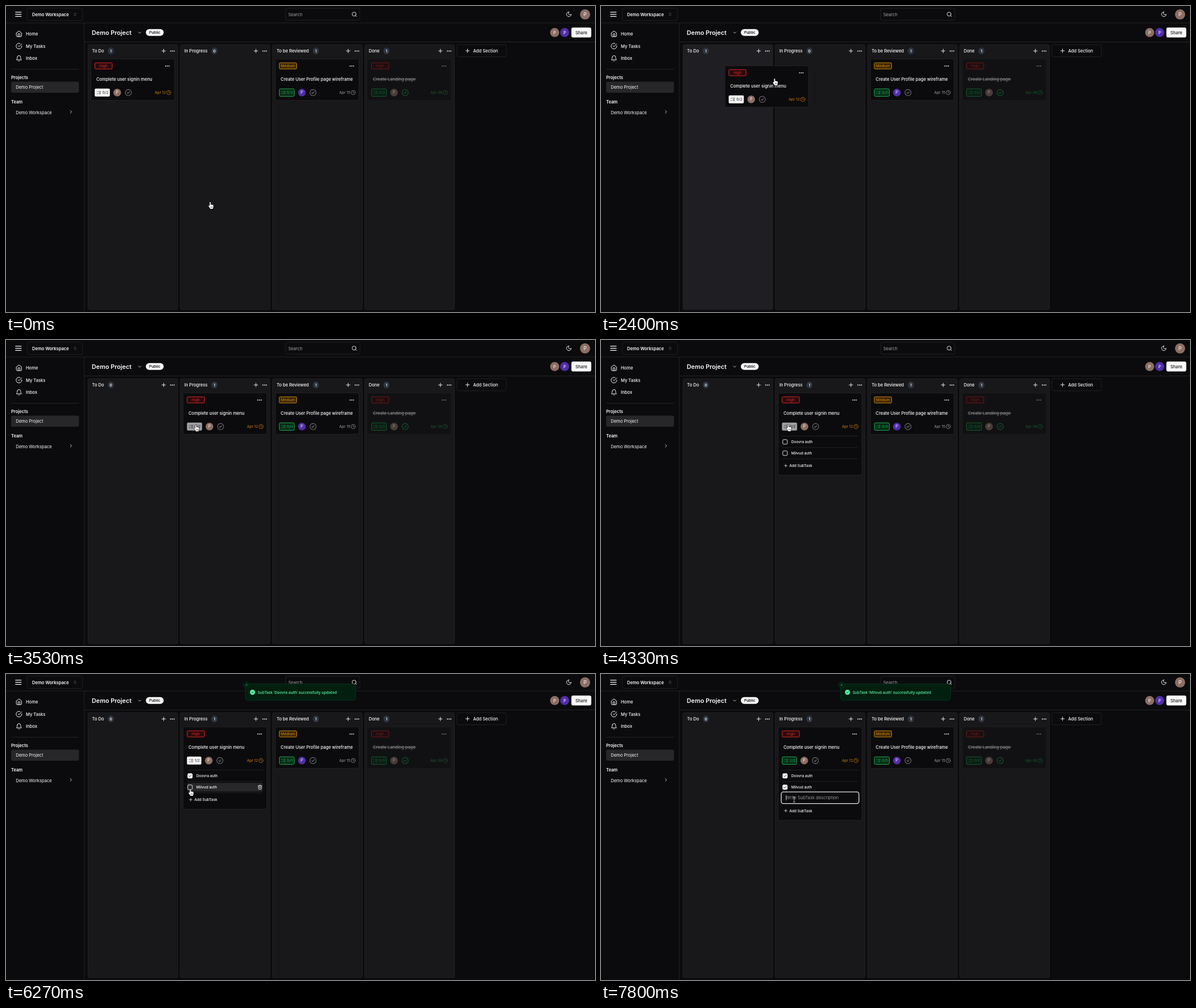
Animation, 1037 px wide and 540 px high, one loop 8 s. Source, as an HTML page with a canvas:

```html
<!DOCTYPE html>
<html lang="en">
<head>
<meta charset="utf-8">
<title>Task board</title>
<style>
html, body { margin: 0; width: 100%; height: 100%; overflow: hidden; background: #0b0b0d; }
canvas { display: block; width: 1037px; height: 540px; }
</style>
</head>
<body>
<canvas id="stage"></canvas>
<script>
const W = 1037, H = 540, LOOP = 8000, STEP = 200 / 3;
const canvas = document.getElementById('stage');
const ctx = canvas.getContext('2d');
const dpr = window.devicePixelRatio || 1;
canvas.width = Math.round(W * dpr);
canvas.height = Math.round(H * dpr);

const BG = '#0b0b0d', COLUMN = '#18181a', ACTIVE = '#1f1f23', LINE = '#27272a';
const WHITE = '#fafafa', GREY = '#a1a1aa', RED = '#dc2626', AMBER = '#d98a0b', GREEN = '#1fae55';
const BROWN = '#8d6e63', PURPLE = '#512da8';
const INTER = 'Inter, sans-serif', SYSTEM = '"Open Sans", sans-serif';
const SM = 7.56, XS = 6.48;

const RING = 'M22 12a10 10 0 1 1-20 0a10 10 0 0 1 20 0';
const ICONS = {
  menu: 'M4 6h16M4 12h16M4 18h16',
  home: 'M3 9l9-7 9 7v11a2 2 0 0 1-2 2H5a2 2 0 0 1-2-2zM9 22V12h6v10',
  tasks: 'M22 11.08V12a10 10 0 1 1-5.93-9.14M22 4 12 14.01l-3-3',
  bell: 'M6 8a6 6 0 0 1 12 0c0 7 3 9 3 9H3s3-2 3-9M10.3 21a1.94 1.94 0 0 0 3.4 0',
  search: 'M19 11a8 8 0 1 1-16 0a8 8 0 0 1 16 0M21 21l-4.3-4.3',
  moon: 'M12 3a6 6 0 0 0 9 9 9 9 0 1 1-9-9Z',
  down: 'M6 9l6 6 6-6',
  right: 'M9 18l6-6-6-6',
  sort: 'M7 15l5 5 5-5M7 9l5-5 5 5',
  plus: 'M5 12h14M12 5v14',
  list: 'M3 17l2 2 4-4M3 7l2 2 4-4M13 6h8M13 12h8M13 18h8',
  done: RING + 'M8 12l3 3 5-6',
  clock: RING + 'M12 6v6l4 2',
  check: 'M20 6 9 17l-5-5',
  trash: 'M3 6h18M19 6v14c0 1-1 2-2 2H7c-1 0-2-1-2-2V6M8 6V4c0-1 1-2 2-2h4c1 0 2 1 2 2v2M10 11v6M14 11v6',
  close: 'M18 6 6 18M6 6l12 12'
};
for (const name in ICONS) ICONS[name] = new Path2D(ICONS[name]);

const HAND = new Path2D('M-2.4 1.6V-5a.9.9 0 0 1 1.8 0V-1.4a.9.9 0 0 1 1.6.2a.9.9 0 0 1 1.6.3a.9.9 0 0 1 1.5.6V2.5q0 1.6-1 3V6H-1.6V5.2L-4.3 1.4a.9.9 0 0 1 1.4-1.1Z');

// time, x, y, smooth
const CURSOR = [
  [0, 361, 352], [533, 184, 166, 1], [600, 184, 166], [867, 175, 161], [1667, 175, 161],
  [1733, 176, 157], [1933, 254, 121], [2067, 254, 121], [2400, 307, 134], [2600, 365, 118],
  [2800, 393, 103], [2933, 396, 102], [3000, 390, 110], [3067, 372, 135], [3333, 340, 157],
  [3800, 330, 153], [3867, 331, 154], [4267, 331, 154], [4333, 331, 155], [4667, 326, 186, 1],
  [5400, 326, 186], [6000, 326, 207, 1], [6200, 326, 207], [6267, 326, 209], [7333, 326, 209],
  [7600, 340, 222, 1]
];
const DRAG = [
  [2067, 0, 0], [2400, 68.6, 12], [2600, 116, 2], [2800, 150, -18],
  [2933, 156, -20.5], [3067, 160, -20.5], [3467, 162.4, 0, 1]
];
const COLUMNS = [
  { x: 144, name: 'To Do', badge: 184.6 },
  { x: 306.4, name: 'In Progress', badge: 367 },
  { x: 468.8, name: 'To be Reviewed', badge: 545.6 },
  { x: 631.2, name: 'Done', badge: 669.8 }
];
const COUNT_WIDTH = { '0/2': 26.6, '1/2': 25.4, '2/2': 26.2, '0/0': 27 };
const SUBTASKS = ['Doovra auth', 'Milvud auth'];

const clamp = v => Math.max(0, Math.min(1, v));
const easeOut = p => 1 - Math.pow(1 - clamp(p), 3);

function along(keys, t) {
  let i = 1;
  while (i < keys.length - 1 && keys[i][0] < t) i++;
  const a = keys[i - 1], b = keys[i];
  let p = clamp((t - a[0]) / (b[0] - a[0]));
  if (b[3]) p = p * p * (3 - 2 * p);
  return { x: a[1] + (b[1] - a[1]) * p, y: a[2] + (b[2] - a[2]) * p };
}

function text(str, x, y, size, color, weight = 400, align = 'left', family = INTER) {
  ctx.font = `${weight} ${size}px ${family}`;
  ctx.textAlign = align;
  ctx.fillStyle = color;
  ctx.fillText(str, x, y + size * 0.36);
}

function box(x, y, w, h, r, fill, stroke, lw = 0.8) {
  ctx.beginPath();
  ctx.roundRect(x, y, w, h, r);
  if (fill) { ctx.fillStyle = fill; ctx.fill(); }
  if (stroke) { ctx.strokeStyle = stroke; ctx.lineWidth = lw; ctx.stroke(); }
}

function disc(x, y, r, fill, stroke) {
  box(x - r, y - r, 2 * r, 2 * r, r, fill, stroke);
}

function rule(x, y, w, h) {
  ctx.fillStyle = LINE;
  ctx.fillRect(x, y, w, h);
}

function icon(name, x, y, size, color, lw = 2) {
  ctx.save();
  ctx.translate(x - size / 2, y - size / 2);
  ctx.scale(size / 24, size / 24);
  ctx.strokeStyle = color;
  ctx.lineWidth = lw;
  ctx.lineCap = ctx.lineJoin = 'round';
  ctx.stroke(ICONS[name]);
  ctx.restore();
}

function dots(x, y) {
  for (const dx of [-3, 0, 3]) disc(x + dx, y, 0.95, WHITE);
}

function avatar(x, y, r, color, size) {
  disc(x, y, r, color);
  text('P', x, y, size, '#fff', 400, 'center');
}

function drawTopBar() {
  rule(0, 29.5, W, 0.9);
  icon('menu', 21.8, 14.7, 15, WHITE);
  box(37.4, 3.8, 97.4, 21.8, 3, BG, LINE);
  text('Demo Workspace', 46, 14.8, SM, WHITE, 600);
  icon('sort', 121.6, 14.6, 7.5, GREY);
  box(492.3, 4, 130.7, 21, 3, BG, LINE);
  text('Search', 497, 14.8, SM, GREY);
  icon('search', 613.3, 14.8, 10.5, WHITE);
  icon('moon', 991, 14.6, 11, WHITE);
  avatar(1019.5, 14.8, 9, BROWN, 8.6);
}

function drawSidebar() {
  rule(137.4, 30, 0.9, H - 30);
  [['home', 'Home', 49], ['tasks', 'My Tasks', 70.8], ['bell', 'Inbox', 92.5]].forEach(([name, label, y]) => {
    icon(name, 22.8, y, 12, WHITE);
    text(label, 35, y, SM, WHITE, 500);
  });
  rule(9, 111, 119.5, 0.9);
  text('Projects', 9, 126, SM, WHITE, 600);
  box(9, 133.4, 119.5, 19.6, 3, LINE);
  text('Demo Project', 17.2, 143.2, SM, WHITE);
  text('Team', 9, 169.3, SM, WHITE, 600);
  text('Demo Workspace', 17.2, 187.8, SM, WHITE);
  icon('right', 114.4, 186.8, 9.5, WHITE);
}

function drawProjectBar() {
  rule(138, 63, W - 138, 0.9);
  text('Demo Project', 151, 46.8, 10.8, WHITE, 600);
  icon('down', 235.4, 47, 9, WHITE);
  box(246.2, 40.8, 31.4, 12, 6, WHITE);
  text('Public', 261.9, 46.8, 6.7, '#18181b', 600, 'center');
  avatar(966, 46.8, 8, BROWN, SM);
  avatar(983.6, 46.8, 8, PURPLE, SM);
  box(995.4, 38, 35, 17.6, 3, WHITE);
  text('Share', 1012.9, 46.8, SM, '#18181b', 500, 'center');
}

function drawColumn(col, count, active) {
  box(col.x + 0.4, 68.2, 158, 467.6, 3, active ? ACTIVE : COLUMN, LINE);
  text(col.name, col.x + 7.6, 79.3, SM, WHITE, 500);
  box(col.badge - 5.2, 73.3, 10.4, 12, 5.2, '#2d3540');
  text(count, col.badge, 79.3, XS, WHITE, 600, 'center');
  icon('plus', col.x + 133.6, 79.3, 11, WHITE);
  dots(col.x + 149, 79.5);
}

function drawTag(label, x, y) {
  const high = label === 'High';
  box(x, y, 30.4, 10.8, 1.5, high ? '#2a0b0d' : '#362405', high ? RED : AMBER, 1);
  text(label, x + 15.2, y + 5.4, XS, high ? RED : AMBER, 400, 'center');
}

function drawCountBadge(label, x, y, hover) {
  const w = COUNT_WIDTH[label], complete = label[0] === label[2];
  if (complete) box(x + 0.4, y + 0.4, w - 0.8, 13.2, 2, '#062a16', GREEN, 1);
  else box(x, y, w, 14, 2, hover ? '#a0a0a2' : WHITE);
  const color = complete ? GREEN : '#18181b';
  icon('list', x + 7.2, y + 7, 9, color);
  text(label, x + 13.4, y + 7, XS + 0.2, color, 400);
  return x + w;
}

// x and y are the top left corner of the card.
function drawCard(x, y, card) {
  box(x + 0.4, y + 0.4, 147.2, (card.height || 74) - 0.8, 3, BG, LINE);
  drawTag(card.tag, x + 7.3, y + 7.3);
  dots(x + 134.8, y + 12.9);
  text(card.title, x + 9.7, y + 35.8, SM, WHITE, 500);
  if (card.struck) {
    ctx.fillStyle = WHITE;
    ctx.fillRect(x + 9.5, y + 35.7, 76.5, 0.8);
  }
  const mid = y + 59.8, right = drawCountBadge(card.count, x + 7, y + 52.8, card.hover);
  avatar(right + 13, mid, 6.8, card.avatar, XS + 0.4);
  icon('done', right + 32.6, mid, 13, card.struck ? GREEN : '#71717a');
  text(card.date, x + 132.2, mid, XS + 0.1, card.dateColor, 400, 'right');
  icon('clock', x + 137.4, mid, 8.8, card.dateColor);
}

function drawCheckbox(x, y, checked) {
  box(x - 4, y - 4, 8, 8, 1.5, checked ? WHITE : null, WHITE, 0.9);
  if (checked) icon('check', x, y, 7, '#18181b', 3);
}

function drawSubtasks(x, y, t, tipY) {
  const input = t >= 7660;
  const checkedAt = [5330, 6530], pressedAt = [5265, 6395];
  rule(x + 7.5, y + 76.2, 133, 0.8);
  SUBTASKS.forEach((label, i) => {
    const mid = y + 86.8 + i * 20;
    const hover = !input && Math.abs(tipY - mid) < 10;
    if (hover) {
      box(x + 7.5, mid - 7.6, 133, 15.2, 2, LINE);
      icon('trash', x + 135.4, mid, 9, WHITE);
    }
    ctx.globalAlpha = t >= pressedAt[i] && t < checkedAt[i] ? 0.6 : 1;
    drawCheckbox(x + 12.4, mid, t >= checkedAt[i]);
    text(label, x + 23.5, mid, XS, WHITE, 500);
    ctx.globalAlpha = 1;
    rule(x + 7.5, mid + 9.6, 133, 0.8);
  });
  if (input) {
    box(x + 5.7, y + 115.2, 136.8, 20.4, 3.5, BG, '#e8e8ea', 1.3);
    text('Write SubTask description', x + 13.7, y + 125.6, SM, '#94949c');
    ctx.fillStyle = WHITE;
    ctx.fillRect(x + 14, y + 121, 0.7, 9);
  }
  const addY = y + (input ? 148.2 : 128.8);
  icon('plus', x + 13.6, addY, 8.4, WHITE);
  text('Add SubTask', x + 19.9, addY, XS, WHITE, 500);
}

function drawToast(label, shift, alpha, scale, body) {
  ctx.save();
  ctx.globalAlpha = alpha;
  ctx.translate(518.5, 32 + shift);
  ctx.scale(scale, scale);
  box(-97, -14.5, 194, 29, 4.3, '#001f0f', '#003d1c');
  if (body) {
    disc(-84.5, 0.3, 4.5, '#59f3a6');
    icon('check', -84.5, 0.3, 5.6, '#001f0f', 3.4);
    text(`SubTask '${label}' successfully updated`, -75.3, 0.6, 6.65, '#59f3a6', 600, 'left', SYSTEM);
    disc(-95, -12.6, 5.2, '#001f0f', '#003d1c');
    icon('close', -95, -12.6, 5.6, '#59f3a6');
  }
  ctx.restore();
}

function drawToasts(t) {
  const first = easeOut((t - 5420) / 500), second = easeOut((t - 6740) / 440);
  if (first > 0 && t < 7780) {
    const fade = 1 - clamp((t - 7360) / 400);
    drawToast(SUBTASKS[0], -29 * (1 - first) + 7.6 * second, first * fade, 1 - 0.05 * second, second === 0);
  }
  if (second > 0) drawToast(SUBTASKS[1], -29 * (1 - second), second, 1, true);
}

function drawCursor(t, p) {
  ctx.save();
  ctx.lineJoin = 'round';
  if (t >= 7660) {
    ctx.translate(340, 221.5);
    ctx.strokeStyle = '#d4d4d8';
    ctx.lineWidth = 0.8;
    ctx.stroke(new Path2D('M-2-4.5h1.4L0-4L.6-4.5H2M0-4V4M-2 4.5h1.4L0 4L.6 4.5H2'));
  } else {
    ctx.translate(p.x, p.y);
    ctx.strokeStyle = '#000';
    ctx.lineWidth = 1.2;
    ctx.stroke(HAND);
    ctx.fillStyle = '#fff';
    ctx.fill(HAND);
    ctx.lineWidth = 0.5;
    ctx.stroke(new Path2D('M-.4 1.8V4.2M1 1.8V4.2M2.4 1.8V4.2'));
  }
  ctx.restore();
}

function draw(t) {
  ctx.setTransform(dpr, 0, 0, dpr, 0, 0);
  ctx.fillStyle = BG;
  ctx.fillRect(0, 0, W, H);
  drawTopBar();
  drawSidebar();
  drawProjectBar();

  const cursor = along(CURSOR, t), drag = along(DRAG, t);
  const tip = { x: cursor.x - 1.5, y: cursor.y - 6 };
  const dropped = t >= 3460, dragging = t >= 2130 && !dropped;
  const target = drag.x > 83 ? 1 : 0;
  const counts = dropped ? [0, 1, 1, 1] : [1, 0, 1, 1];
  COLUMNS.forEach((col, i) => drawColumn(col, counts[i], dragging && i === target));

  box(793.8, 68.3, 87, 21.4, 3, BG, LINE);
  icon('plus', 812.6, 79, 11, WHITE);
  text('Add Section', 822.5, 79, SM, WHITE, 500);

  drawCard(473.9, 93, {
    tag: 'Medium', title: 'Create User Profile page wireframe', count: '0/0',
    avatar: PURPLE, date: 'Apr 15', dateColor: GREY
  });
  ctx.globalAlpha = 0.45;
  drawCard(636.2, 93, {
    tag: 'High', title: 'Create Landing page', count: '0/0', struck: true,
    avatar: BROWN, date: 'Apr 08', dateColor: GREEN
  });
  ctx.globalAlpha = 1;

  const x = 149.2 + drag.x, y = 93 + drag.y, open = t >= 4060;
  const overBadge = !dragging && tip.x > x + 7 && tip.x < x + 34 && tip.y > y + 52 && tip.y < y + 67;
  drawCard(x, y, {
    tag: 'High', title: 'Complete user signin menu',
    count: t >= 6790 ? '2/2' : t >= 5460 ? '1/2' : '0/2',
    avatar: BROWN, date: 'Apr 12', dateColor: '#d97f0a', hover: overBadge,
    height: t >= 7660 ? 165.6 : open ? 146 : 74
  });
  if (open) drawSubtasks(x, y, t, tip.y);
  drawToasts(t);
  drawCursor(t, cursor);
}

function tick(now) {
  const t = now % LOOP;
  draw(Math.floor((t + 4) / STEP) * STEP);
  requestAnimationFrame(tick);
}
requestAnimationFrame(tick);
</script>
</body>
</html>
```
